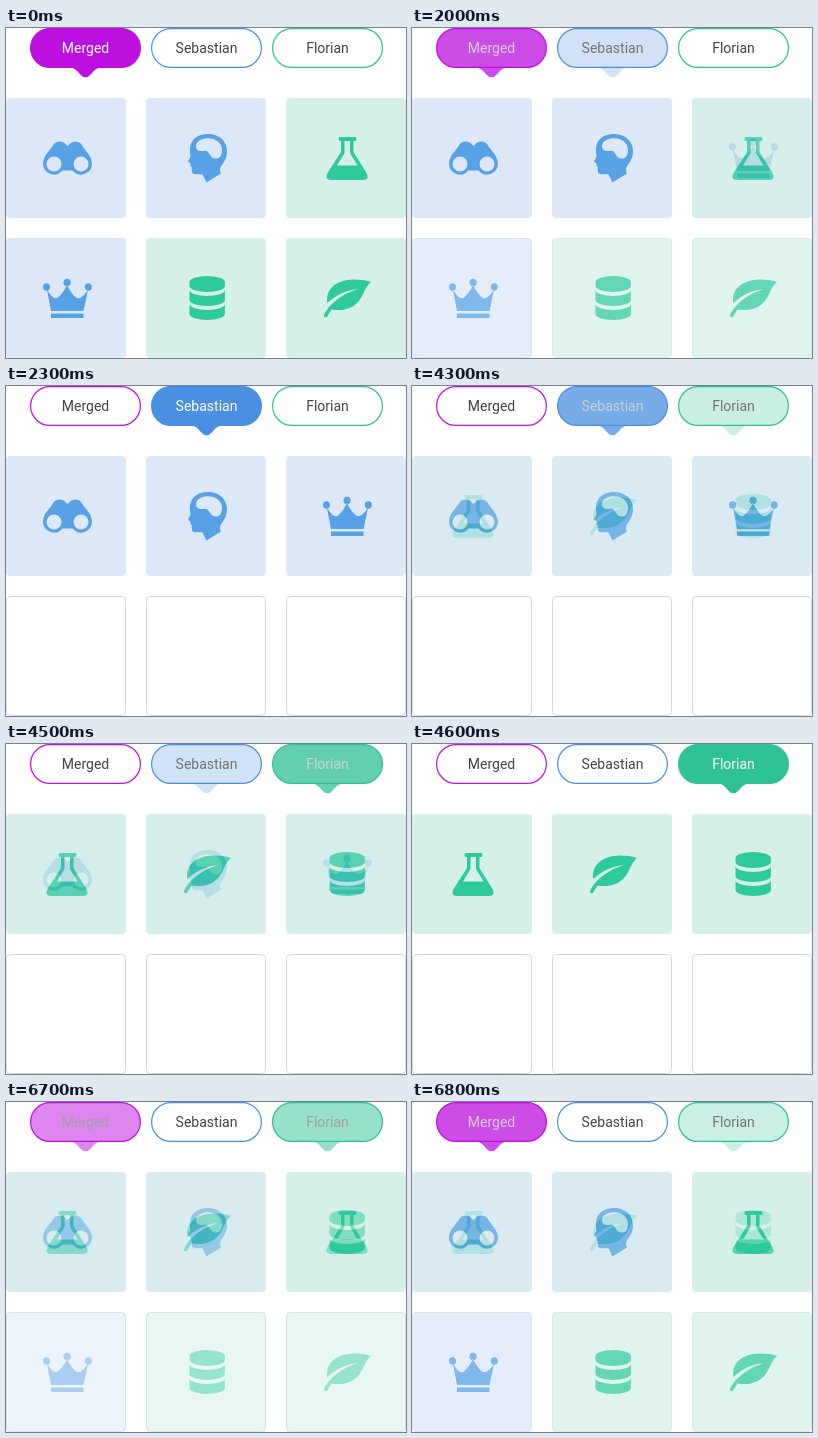
Animation, 400 px wide and 330 px high, one loop 6900 ms. Source, as an HTML page:

```html
<!DOCTYPE html>
<html lang="en">
<head>
<meta charset="utf-8">
<title>Shared interests</title>
<style>
  html, body { margin: 0; height: 100%; overflow: hidden; background: #fff; }
  svg { display: block; width: 400px; height: 330px; }
  text { font: 14px Roboto, sans-serif; text-anchor: middle; }
</style>
</head>
<body>
<svg id="stage" viewBox="0 0 400 330"></svg>
<script>
const stage = document.getElementById('stage');
const blue = { icon: '#57a1e6', back: '#dce8f8' };
const green = { icon: '#2fca9c', back: '#d5f1e7' };

const tabs = [
  { name: 'Merged', color: '#bd10e0' },
  { name: 'Sebastian', color: '#4a90e2' },
  { name: 'Florian', color: '#2ec193' },
];

// Icon paths in the coordinates of a 120 x 120 card
const icons = {
  binoculars: { tone: blue, path: `M37 66C37 57 45 52 47.5 46.5C50 42.5 57 42.5 59.5 46
    C60.5 48 62.5 48 63.5 46C66 42.5 73 42.5 75.5 46.5C78 52 86 57 86 66
    A11 11 0 0 1 66.5 72.5H56.5A11 11 0 0 1 37 66Z
    M40.5 66a7.5 7.5 0 0 0 15 0a7.5 7.5 0 0 0 -15 0Z
    M67.5 66a7.5 7.5 0 0 0 15 0a7.5 7.5 0 0 0 -15 0Z` },
  head: { tone: blue, path: `M62 36C73 36 81 43 81 53C81 60 78 64 75.5 67.5
    C73.5 70 73.5 73 75 75.5L60.5 84.5L56.5 76.5C54 75.5 51 77 48 76
    C45 75 46.5 72.5 45.5 71.5L46 69.5L44.5 68C45 66 44.5 65 42.5 64
    C41.5 63 44 60.5 44.5 58.5C44.5 56 43.5 54 44 50C45 41 52 36 62 36Z
    M50 48C50 44 55 40.5 61 40.3C70 40 76 45 76 52C76 57 74 60 71 60.5
    C67 61 65 59 63.5 56C62 53 60 52 57 53C53 53.5 50 52 50 48Z` },
  flask: { tone: green, path: `M54 39H69Q70.5 39 70.5 41T69 43H67.5V54L80.5 75
    Q84 82 77 82H45Q38 82 41.5 75L55 54V43H54Q52.500 43 52.500 41T54 39Z
    M58.5 43V55L51 67.500H71.500L64 55V43Z` },
  crown: { tone: blue, path: `M41 52C45 58 49 62 52 59.5C56 56 59 51 61 47
    C63 51 66 56 70 59.500C73 62 78 58 82 52L77.500 73H45Z
    M45 75.500H77.500V80H45Z
    M37 49a3.500 3.700 0 0 0 7 0a3.500 3.700 0 0 0 -7 0Z
    M57.500 44.500a3.600 3.800 0 0 0 7.200 0a3.600 3.800 0 0 0 -7.200 0Z
    M78.800 49a3.500 3.700 0 0 0 7 0a3.500 3.700 0 0 0 -7 0Z` },
  database: { tone: green, path: `M43.500 44a17.700 6 0 0 1 35.400 0v4a17.700 6 0 0 1 -35.400 0Z
    M43.500 52a17.700 6 0 0 0 35.400 0v10a17.700 6 0 0 1 -35.400 0Z
    M43.500 66a17.700 6 0 0 0 35.400 0v10a17.700 6 0 0 1 -35.400 0Z` },
  leaf: { tone: green, path: `M85 44C79 42 74 41.400 67 41.500C52 42 42 49 41 60
    Q40.800 63 41.300 65C50 57 59 52.500 72 51C61 54.500 51 60 43.500 68.500
    C41 71.500 39 74.500 38 77C37.500 79.500 40.500 80 41.500 78L45.500 71.500
    C58 73.500 68 70 74 61.500C78 56 79 49 85 44Z` },
};

const views = [
  ['binoculars', 'head', 'flask', 'crown', 'database', 'leaf'],
  ['binoculars', 'head', 'crown'],
  ['flask', 'leaf', 'database'],
];

function tab({ name, color }, i, active) {
  const tail = `<path fill="${color}" d="M-16 39.300C-10.500 40 -8.500 43 -5.500 46.200
    Q0 52.500 5.500 46.200C8.500 43 10.500 40 16 39.300Z"/>`;
  return `<g transform="translate(${79.5 + 121 * i})">
    ${active ? tail : ''}
    <rect x="-54.900" y=".6" width="109.800" height="38.800" rx="19.400"
      stroke="${color}" stroke-width="1.200" fill="${active ? color : '#fff'}"/>
    <text y="25" fill="${active ? '#fff' : '#444'}">${name}</text></g>`;
}

function card(name, i) {
  const place = `translate(${i % 3 * 140} ${i < 3 ? 70 : 210})`;
  if (!name) {
    return `<rect transform="${place}" x=".5" y=".5" width="119" height="119" rx="4"
      fill="#fff" stroke="#d8d8d8"/>`;
  }
  const { tone, path } = icons[name];
  return `<g transform="${place}">
    <rect width="120" height="120" rx="4" fill="${tone.back}"/>
    <path fill="${tone.icon}" fill-rule="evenodd" d="${path}"/></g>`;
}

function layer(v) {
  const cards = Array.from({ length: 6 }, (_, i) => card(views[v][i], i));
  return `<g><rect width="400" height="330" fill="#fff"/>
    ${tabs.map((t, i) => tab(t, i, i === v)).join('')}${cards.join('')}</g>`;
}

// Opaque layers stacked in order; each fades in over the one below
stage.innerHTML = [0, 1, 2, 0].map(layer).join('');
const layers = [...stage.children];
const starts = [2000, 4300, 6600];

function draw() {
  const time = performance.now() % 6900;
  starts.forEach((start, i) => {
    const step = Math.floor((time - start) / 100) + 1;
    layers[i + 1].setAttribute('opacity', Math.min(Math.max(step / 4, 0), 1));
  });
  requestAnimationFrame(draw);
}
draw();
</script>
</body>
</html>
```
